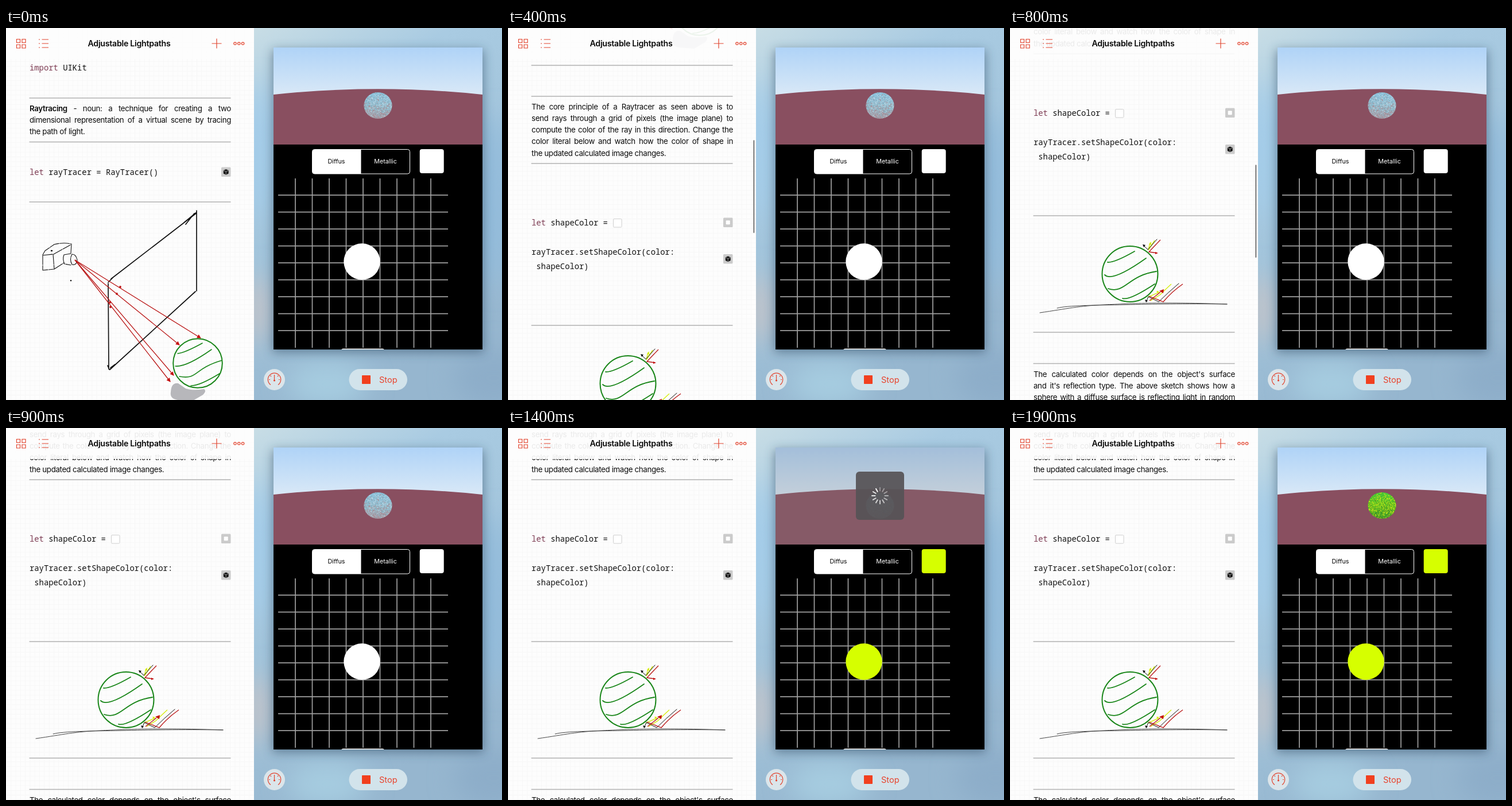
Write an HTML page that moves like this. It is 864 px wide and 648 px high and loops after 2000 ms.

```html
<!DOCTYPE html>
<html lang="en">
<head>
<meta charset="utf-8">
<title>Adjustable Lightpaths</title>
<style>
  html, body { margin: 0; width: 100%; height: 100%; overflow: hidden; background: #fdfdfd; }
  svg { display: block; font-family: Inter, "Open Sans", sans-serif; }
  .title { font-size: 14.2px; font-weight: 600; letter-spacing: -.02em; text-anchor: middle; fill: #0a0a0a; }
  .code { font: 13.85px "Noto Sans Mono", "DejaVu Sans Mono", monospace; fill: #111; white-space: pre; }
  .key { fill: #7d3c53; }
  .prose { font-size: 13.3px; line-height: 20.2px; letter-spacing: -.026em; color: #0c0c0c; }
  .prose div { text-align: justify; text-align-last: justify; }
  .prose div:last-child { text-align-last: left; }
  .tab { font-size: 10.8px; text-anchor: middle; }
  .rule { stroke: #b2b2b2; stroke-width: 1.3; }
  .ink { fill: none; stroke: #111; stroke-linecap: round; stroke-linejoin: round; }
  .green { fill: none; stroke: #198619; stroke-width: 2; stroke-linecap: round; }
  .red { fill: none; stroke: #b91515; stroke-width: 1.3; }
  .yellow { fill: none; stroke: #d6ee12; stroke-width: 1.4; }
  .icon { fill: none; stroke: #e2452f; stroke-width: 1.2; }
</style>
</head>
<body>
<svg width="864" height="648" viewBox="0 0 864 648">
  <defs>
    <pattern id="paper" width="8.3" height="8.3" patternUnits="userSpaceOnUse">
      <path d="M0 .5H8.3M.5 0V8.3" stroke="#f7f7f7"/>
    </pattern>
    <linearGradient id="wall" x2=".35" y2="1">
      <stop offset="0" stop-color="#c8dde5"/><stop offset=".25" stop-color="#a9cbe2"/>
      <stop offset=".7" stop-color="#9fc1d8"/><stop offset="1" stop-color="#96b6cf"/>
    </linearGradient>
    <linearGradient id="sky" x2="0" y2="1">
      <stop offset="0" stop-color="#afd3f7"/><stop offset="1" stop-color="#dae9f7"/>
    </linearGradient>
    <linearGradient id="dim"><stop offset="0" stop-color="#cbcbcb"/><stop offset="1" stop-color="#adadad"/></linearGradient>
    <linearGradient id="ballBlue" x2="0" y2="1">
      <stop offset="0" stop-color="#8cc3de"/><stop offset=".6" stop-color="#9bbdcb"/><stop offset="1" stop-color="#a59aa4"/>
    </linearGradient>
    <linearGradient id="ballGreen" x2="0" y2="1">
      <stop offset="0" stop-color="#45cb3a"/><stop offset=".5" stop-color="#7acb1c"/><stop offset="1" stop-color="#3f9426"/>
    </linearGradient>
    <filter id="soft" x="-60%" y="-60%" width="220%" height="220%"><feGaussianBlur stdDeviation="22"/></filter>
    <filter id="shade" x="-20%" y="-20%" width="140%" height="140%"><feGaussianBlur stdDeviation="9"/></filter>
    <clipPath id="page"><rect width="432" height="648"/></clipPath>
    <clipPath id="side"><rect x="432" width="432" height="648"/></clipPath>
    <clipPath id="view"><rect x="466" y="34" width="364" height="526"/></clipPath>
    <clipPath id="ball"><ellipse cx="648" cy="135" rx="24.5" ry="23"/></clipPath>
    <clipPath id="pill"><rect x="653" y="183" width="169" height="17" rx="8.5"/></clipPath>
    <g id="cube">
      <rect width="16.5" height="16.5" rx="1.5" fill="#cbcbcb"/>
      <path d="M8.2 3.4L12.7 5.4V10.9L8.2 13.3L3.8 10.9V5.4Z" fill="#151515"/>
      <path d="M4.2 5.8L8.2 7.7L12.3 5.8M8.2 7.7V12.8" fill="none" stroke="#cbcbcb" stroke-width=".7"/>
    </g>
  </defs>

  <g clip-path="url(#page)">
    <rect width="432" height="648" fill="#fdfdfd"/>
    <rect width="432" height="648" fill="url(#paper)"/>
    <g id="notes">
      <g id="rules"></g>
      <g class="code">
        <text x="41" y="74"><tspan class="key">import</tspan> UIKit</text>
        <text x="41" y="255.5"><tspan class="key">let</tspan> rayTracer = RayTracer()</text>
        <text x="41" y="958"><tspan class="key">let</tspan> shapeColor =</text>
        <text x="41" y="1008.5">rayTracer.setShapeColor(color:</text>
        <text x="49.3" y="1033.5">shapeColor)</text>
      </g>
      <use href="#cube" x="375" y="242.5"/>
      <use href="#cube" x="375" y="1008"/>
      <rect x="183.5" y="946.5" width="14.5" height="14.5" rx="1.5" fill="#fff" stroke="#cfcfcf"/>
      <rect x="375" y="944.5" width="16.5" height="16.5" rx="1.5" fill="#cbcbcb"/>
      <rect x="379.7" y="949.2" width="7" height="7" rx="1" fill="#fff"/>

      <foreignObject x="41" y="129.8" width="351" height="64"><div class="prose">
        <div><b style="font-weight:600">Raytracing</b> - noun: a technique for creating a two</div>
        <div>dimensional representation of a virtual scene by tracing</div>
        <div>the path of light.</div>
      </div></foreignObject>
      <foreignObject x="41" y="740.8" width="351" height="105"><div class="prose">
        <div>The core principle of a Raytracer as seen above is to</div>
        <div>send rays through a grid of pixels (the image plane) to</div>
        <div>compute the color of the ray in this direction. Change the</div>
        <div>color literal below and watch how the color of shape in</div>
        <div>the updated calculated image changes.</div>
      </div></foreignObject>
      <foreignObject x="41" y="1397.7" width="351" height="105"><div class="prose">
        <div>The calculated color depends on the object's surface</div>
        <div>and it's reflection type. The above sketch shows how a</div>
        <div>sphere with a diffuse surface is reflecting light in random</div>
        <div>directions. Below you can switch between the two</div>
        <div>reflection types, diffus and glossy-metallic.</div>
      </div></foreignObject>

      <!-- camera, image plane and sphere -->
      <path d="M287 634Q288 617 300 619L313 628Q325 632 345 629Q350 632 343 639L324 650L299 648Q285 646 287 634Z" fill="#b7b7bb"/>
      <path class="ink" stroke-width="1.1" stroke-dasharray="17 1.5" d="M64 396L82 394L84 420L64 422ZM64 395L68 388L84 377Q100 373 113 376M83 394L112 378M114 376L113 392M84 420L101 409M101 395Q98 403 102 411L113 413M101 395L113 393"/>
      <path class="ink" stroke-width="1.1" d="M115 394Q110 403 115 412Q123 414 124 404Q122 394 115 394"/>
      <path class="ink" stroke-width="2.4" d="M79 388h1M113 440h.1" />
      <path class="ink" stroke-width="1.7" d="M332 318L332 458M183 437L331 323M313 342L328 323M310 339L332 321M178 445L179 594M178 443L188 433M177 588L180 595M330 459L181 595M190 586L182 592"/>
      <g id="rays"></g>
      <g class="green">
        <circle cx="334" cy="584" r="42.8"/>
        <path d="M299 567Q311 566 342 549M295 589Q314 591 358 560M302 607C335 613 325 594 376 579M322 623Q336 624 372 602" stroke-width="1.6"/>
      </g>

      <!-- diffuse reflection -->
      <g transform="translate(0 884)">
        <path class="ink" stroke="#333" stroke-width="1" d="M52 417C100 410 120 405 165 403S270 398 378 402M82 409C100 404 150 404 200 403S300 401 378 402" style="stroke:#444"/>
        <g class="green">
          <circle cx="209" cy="349.5" r="48.5"/>
          <path d="M170 329Q182 330 217 310M165 351Q178 364 237 322M171 375C200 385 205 352 255 345M196 392Q208 396 252 367" stroke-width="1.8"/>
        </g>
        <path class="yellow" d="M252 291L241 308L244 295M281 367Q270 377 261 386L245 396M240 390L260 381"/>
        <path class="ink" stroke-width="1" d="M256 289L240 307L233 300M294 366Q275 382 259 398L241 389L238 396"/>
        <path class="red" d="M262 290L242 311L256 313M301 367Q282 380 267 398L242 388M243 396L262 381"/>
        <path d="M231 298l5 1l-3 4zM235 394l5 2l-3 3z" fill="#111"/>
        <path d="M242 298l4-5v6zM255 379l4 0l-2 4z" fill="#d6ee12"/>
        <path d="M253 311l5 2l-5 2zM260 379l8-3l-1 7z" fill="#c40d0d"/>
      </g>
    </g>
    <rect width="432" height="54" fill="#fdfdfd" opacity=".92"/>
    <text class="title" x="214.5" y="32">Adjustable Lightpaths</text>
    <path class="icon" d="M18.5 19.5h6v6h-6zM28 19.5h6v6h-6zM18.5 29h6v6h-6zM28 29h6v6h-6zM62.5 20H74M62.5 27H74M62.5 34H74M57 20h2M57 27h2M57 34h2M358.5 27h17M367 18.5v17"/>
    <g class="icon"><circle cx="399" cy="27" r="2.2"/><circle cx="405.8" cy="27" r="2.2"/><circle cx="412.6" cy="27" r="2.2"/></g>
    <rect id="bar" x="427" width="2.6" height="162" rx="1.3" fill="#8f8f8f"/>
  </g>

  <g clip-path="url(#side)">
    <rect x="432" width="432" height="648" fill="url(#wall)"/>
    <g filter="url(#soft)">
      <ellipse cx="438" cy="215" rx="22" ry="120" fill="#a3cdeb"/>
      <ellipse cx="440" cy="490" rx="24" ry="60" fill="#c3c3c8"/>
      <ellipse cx="850" cy="300" rx="30" ry="150" fill="#92bbdb"/>
      <ellipse cx="560" cy="620" rx="70" ry="40" fill="#a6cce0"/>
      <ellipse cx="850" cy="610" rx="70" ry="50" fill="#8dadc9"/>
    </g>
    <rect x="464" y="38" width="368" height="527" fill="#25435c" opacity=".5" filter="url(#shade)"/>
    <g clip-path="url(#view)">
      <rect x="466" y="34" width="364" height="84" fill="url(#sky)"/>
      <path d="M466 116Q648 96.5 830 116V203H466Z" fill="#894f60"/>
      <g clip-path="url(#ball)">
        <rect id="ballFill" x="623" y="111" width="50" height="48"/>
        <g id="blueGrain"></g>
        <g id="greenGrain"></g>
      </g>
      <rect x="466" y="203" width="364" height="357" fill="#000"/>
      <path id="grid" stroke="#a0a0a0" stroke-width="1.7"/>
      <circle id="disc" cx="620" cy="407" r="31.7"/>
      <rect x="584" y="558.4" width="75" height="6" rx="3" fill="#fff"/>
      <g id="busy">
        <rect x="466" y="34" width="364" height="169" fill="#7d7d7d" opacity=".24"/>
        <rect x="606" y="76" width="84" height="84" rx="6" fill="#575357" opacity=".93"/>
        <g id="spinner"></g>
      </g>
    </g>
    <rect id="tabs" x="533.5" y="211.5" width="170" height="42.5" rx="4" fill="#000"/>
    <path id="tabOn" d="M618.5 211.5H537.5Q533.5 211.5 533.5 215.5V250Q533.5 254 537.5 254H618.5Z"/>
    <text class="tab" id="diffus" x="575.5" y="236.3">Diffus</text>
    <text class="tab" id="metallic" x="661" y="236.3">Metallic</text>
    <rect id="swatch" x="720.7" y="211" width="42" height="42" rx="4"/>
    <g id="picker">
      <path d="M736 201H756L746 210Z" fill="#333"/>
      <rect x="653" y="184" width="169" height="18.5" rx="8.5" fill="#383838"/>
      <g id="hues" clip-path="url(#pill)"></g>
    </g>
    <circle cx="467.5" cy="612.5" r="18.5" fill="#dbe5ea"/>
    <path class="icon" stroke-width="1.6" d="M461 621.5A11.2 11.2 0 1 1 474 621.5M467.5 604V614M460 612.5h-2M475 612.5h2M462 607l-1.5-1.5M473 607l1.5-1.5"/>
    <circle cx="467.5" cy="614" r="1.6" fill="#e2452f"/>
    <rect x="597.5" y="594" width="101.5" height="37" rx="18.5" fill="#d2e3eb"/>
    <rect x="620" y="605" width="15" height="15" rx=".8" fill="#f1401f"/>
    <text x="650" y="618" font-size="14.6" fill="#e8432c">Stop</text>
  </g>
</svg>
<script>
const el = id => document.getElementById(id);
const set = (id, attrs) => { for (const key in attrs) el(id).setAttribute(key, attrs[key]); };
const show = (id, on) => set(id, { visibility: on ? "visible" : "hidden" });
const range = n => [...Array(n).keys()];

el("rules").innerHTML = [122, 198.5, 303, 679, 733, 850, 1132, 1335, 1389.5, 1507]
  .map(y => `<path class="rule" d="M40.5 ${y}H391.5"/>`).join("");

set("grid", { d: range(9).map(i => {
  const step = 29.5 * i;
  return `M${504 + step} 262V557M474 ${291.2 + step}H770`;
}).join("") });

function ray([x, y]) {
  const angle = Math.atan2(y - 404, x - 120) * 180 / Math.PI;
  return `<path class="red" d="M120 404L${x} ${y}"/>
    <path d="M1 0L-6 -3.5V3.5Z" fill="#c40d0d" transform="translate(${x} ${y}) rotate(${angle})"/>`;
}
el("rays").innerHTML = [[302, 552], [339, 540], [286, 616], [292, 605]].map(ray).join("") +
  [[199, 451], [193, 463], [181, 478], [182, 486]]
    .map(([x, y]) => `<circle cx="${x}" cy="${y}" r="1.9" fill="#c01212"/>`).join("");

el("hues").innerHTML = ["#c10c0c", "#f04a20", "#ffa500", "#d8fa00", "#d8fa00", "#40f600", "#40f600", "#70f570", "#3bf3d9", "#3bf3d9"]
  .map((color, i) => `<rect x="${653 + 16.9 * i}" y="183" width="17.2" height="17" fill="${color}"/>`).join("");

el("spinner").innerHTML = range(12).map(i =>
  `<path d="M0 -8.5V-14" stroke="#fff" stroke-width="2" stroke-linecap="round"
    opacity="${0.35 + 0.6 * i / 11}" transform="rotate(${30 * i})"/>`).join("");

let seed = 7;
const random = () => (seed = seed * 16807 % 2147483647) / 2147483647;

// bias above 1 gathers the grains towards the bottom of the ball
function grains(color, count, bias = 1) {
  const d = range(count).map(() => {
    const x = 623 + 50 * random(), y = 112 + 46 * random() ** (1 / bias);
    return `M${x.toFixed(1)} ${y.toFixed(1)}h1.3`;
  }).join("");
  return `<path d="${d}" stroke="${color}" stroke-width="1.3"/>`;
}
el("blueGrain").innerHTML = grains("#b9d8e6", 260) + grains("#7faabd", 240) + grains("#a58c95", 240, 2.5);
el("greenGrain").innerHTML = grains("#38b52c", 300) + grains("#cbe51b", 330, 1.3) + grains("#3d8a26", 180, 3);

const scrollSteps = [[0, 0], [300, 230], [400, 614], [500, 830], [600, 884], [800, 805], [900, 760]];
const LIME = "#d6ff00";

function draw(time) {
  const scroll = scrollSteps.filter(([start]) => time >= start).pop()[1];
  const scrolling = time >= 300 && time < 600 || time >= 800 && time < 900;
  const picking = time >= 1200 && time < 1400;
  const picked = time >= 1400;
  const rendered = time >= 1900;

  set("notes", { transform: `translate(0 ${-scroll})` });
  set("bar", { y: 57 + scroll * 0.225 });
  show("bar", scrolling);

  show("picker", picking);
  set("tabs", { stroke: picking ? "#bdbdbd" : "#fff" });
  set("tabOn", { fill: picking ? "url(#dim)" : "#fff" });
  set("diffus", { fill: picking ? "#555" : "#000" });
  set("metallic", { fill: picking ? "#b5b5b5" : "#fff" });
  set("swatch", { fill: picking ? "#dedfde" : picked ? LIME : "#fff" });
  set("disc", { fill: picked ? LIME : "#fff" });

  show("busy", picked && !rendered);
  const turn = 30 * Math.floor((time - 1400) / 100);
  set("spinner", { transform: `translate(648 118) rotate(${turn})` });
  set("ballFill", { fill: rendered ? "url(#ballGreen)" : "url(#ballBlue)" });
  show("blueGrain", !rendered);
  show("greenGrain", rendered);
}

const begin = performance.now();
function tick() {
  draw((performance.now() - begin) % 2000);
  requestAnimationFrame(tick);
}
tick();
</script>
</body>
</html>
```
